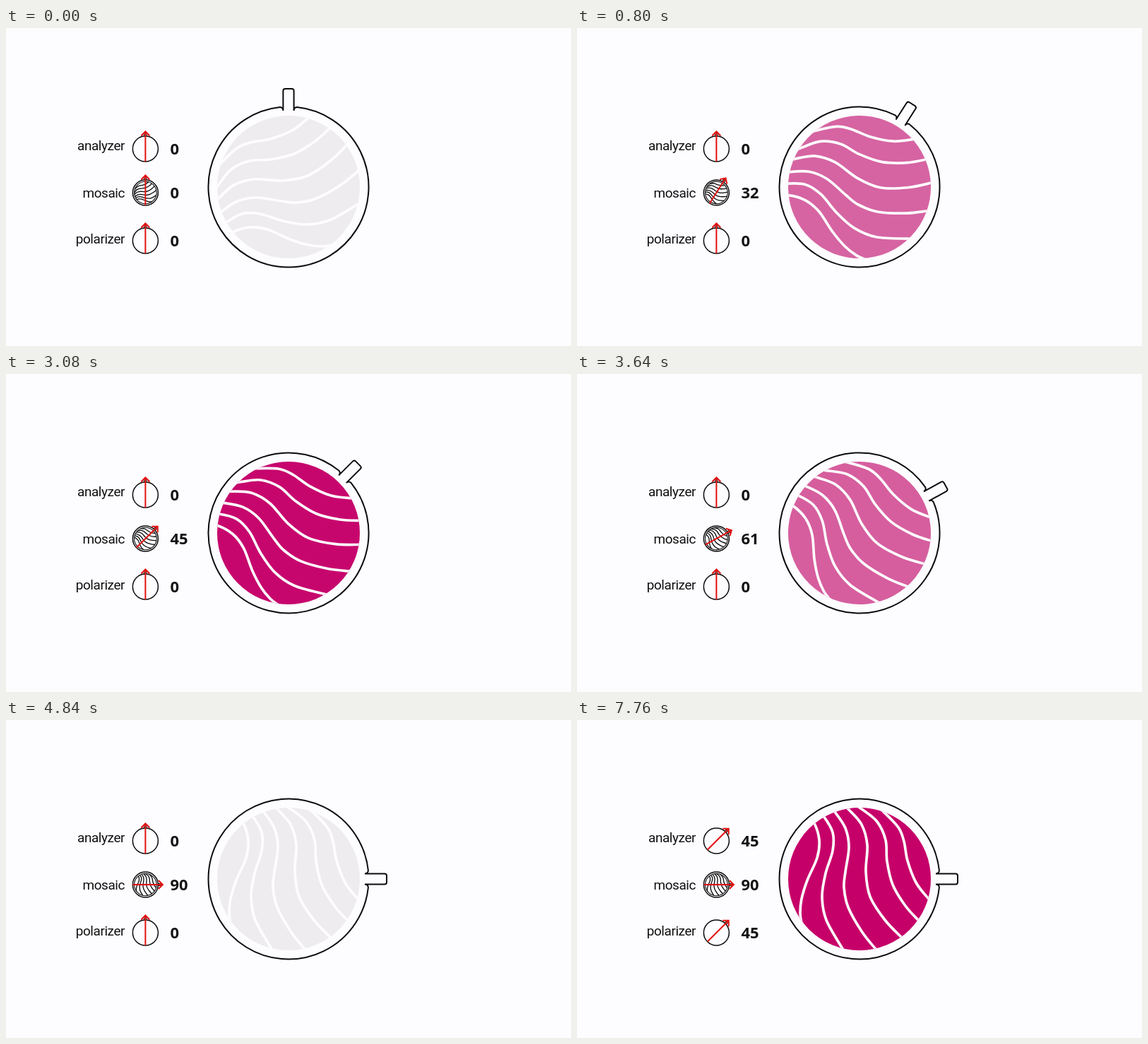
Animation of 800x450 px, one loop 10 s. Source, as an HTML page:

```html
<!DOCTYPE html>
<html lang="en">
<head>
<meta charset="utf-8">
<title>Polarizer, mosaic, analyzer</title>
<style>
  html, body { margin: 0; width: 100%; height: 100%; overflow: hidden; background: #fdfcff; }
  svg { display: block; width: 100%; height: 100%; }
  .label { font: 400 19px Roboto, sans-serif; letter-spacing: -.45px; text-anchor: end; fill: #111; }
  .value { font: 700 22px "Noto Sans", "Open Sans", sans-serif; fill: #111; }
  .ink { fill: none; stroke: #0b0b0b; }
  .arrow { fill: none; stroke: #e2100f; stroke-width: 2; }
</style>
</head>
<body>
<svg viewBox="0 0 800 450">
  <defs>
    <clipPath id="disk"><circle r="101"/></clipPath>
    <g id="waves" fill="none" clip-path="url(#disk)"></g>
  </defs>
  <g transform="translate(400 225)">
    <g id="dial">
      <path class="ink" stroke-width="2" d="M-12-112.9Q-7.6-112.5-7.6-108V-136Q-7.6-139-4.6-139H4.6Q7.6-139 7.6-136V-108Q7.6-112.5 12-112.9A113.5 113.5 0 1 1-12-112.9Z"/>
      <circle r="101" fill="#eeecef"/>
      <circle r="101" fill="#c60069" id="tint"/>
      <use href="#waves" stroke="#fdfcff" stroke-width="3.7"/>
    </g>
  </g>
  <g id="legend"></g>
</svg>
<script>
const $ = id => document.getElementById(id);

// Wave lines at zero rotation, relative to the disk centre (x, y pairs).
const waves = [
  [-106,-20, -96,-33, -73,-55, -53,-63, -26,-68, 5,-80, 27,-97, 35,-106],
  [-106,8, -99,-3, -81,-25, -55,-37, -25,-39, 8,-47, 38,-65, 59,-84, 66,-92],
  [-106,24, -98,15, -77,-3, -48,-11, -10,-9, 25,-15, 58,-36, 83,-60, 90,-68],
  [-104,44, -95,35, -72,20, -45,15, -10,20, 12,22, 40,16, 74,-3, 98,-22, 106,-30],
  [-99,62, -89,51, -66,38, -40,38, -8,48, 25,53, 58,47, 97,25, 106,19],
  [-90,74, -79,64, -55,57, -30,60, 2,74, 28,82, 48,84, 62,82, 75,78]
];

// Catmull-Rom spline as cubic Bezier segments.
function spline(c) {
  const at = i => { const k = Math.max(0, Math.min(c.length / 2 - 1, i)) * 2; return [c[k], c[k + 1]]; };
  let d = `M${at(0)}`;
  for (let i = 0; i < c.length / 2 - 1; i++) {
    const [p, a, b, n] = [i - 1, i, i + 1, i + 2].map(at);
    d += `C${a.map((v, k) => v + (b[k] - p[k]) / 6)} ${b.map((v, k) => v - (n[k] - a[k]) / 6)} ${b}`;
  }
  return d;
}
$('waves').innerHTML = waves.map(c => `<path d="${spline(c)}"/>`).join('');

const miniMosaic = `<circle class="ink" r="15.8" stroke-width="1.1"/>
  <use href="#waves" transform="scale(.155)" stroke="#0b0b0b" stroke-width="8.5"/>`;

const rows = [['analyzer', 171, 173], ['mosaic', 233, 239.5], ['polarizer', 301, 305]];
$('legend').innerHTML = rows.map(([name, y, baseline]) => `
  <text class="label" x="168" y="${baseline}">${name}</text>
  <g transform="translate(197.4 ${y})"><g id="${name}">
    <circle class="ink" r="18" stroke-width="1.5"/>
    <path class="ink" stroke-width="1" d="M-1.6-18V-21H1.6V-18"/>
    ${name === 'mosaic' ? miniMosaic : ''}
    <path class="arrow" d="M0 18V-24.5M-6-18.5L0-24.5L6-18.5"/>
  </g></g>
  <text class="value" id="${name}Value" x="232.5" y="${y + 8}"></text>`).join('');

const progress = (t, start, length) => Math.max(0, Math.min(1, (t - start) / length));
const smooth = u => u * u * (3 - 2 * u);
const easeOut = u => Math.sin(u * Math.PI / 2);

function setAngle(name, angle) {
  $(name).setAttribute('transform', `rotate(${angle})`);
  $(name + 'Value').textContent = Math.round(angle);
}

function draw(now) {
  const t = Math.floor(now % 10000 / 40) * 40;
  const mosaic = 45 * easeOut(progress(t, 0, 1560)) + 45 * smooth(progress(t, 3040, 1480));
  const filters = 45 * smooth(progress(t, 6360, 1040));
  setAngle('mosaic', mosaic);
  setAngle('analyzer', filters);
  setAngle('polarizer', filters);
  $('dial').setAttribute('transform', `rotate(${mosaic})`);
  $('tint').setAttribute('opacity',
    progress(t, 0, 1400) - progress(t, 3040, 1500) + progress(t, 6360, 1000));
}

const begin = performance.now();
function loop() {
  draw(performance.now() - begin);
  requestAnimationFrame(loop);
}
loop();
</script>
</body>
</html>
```
